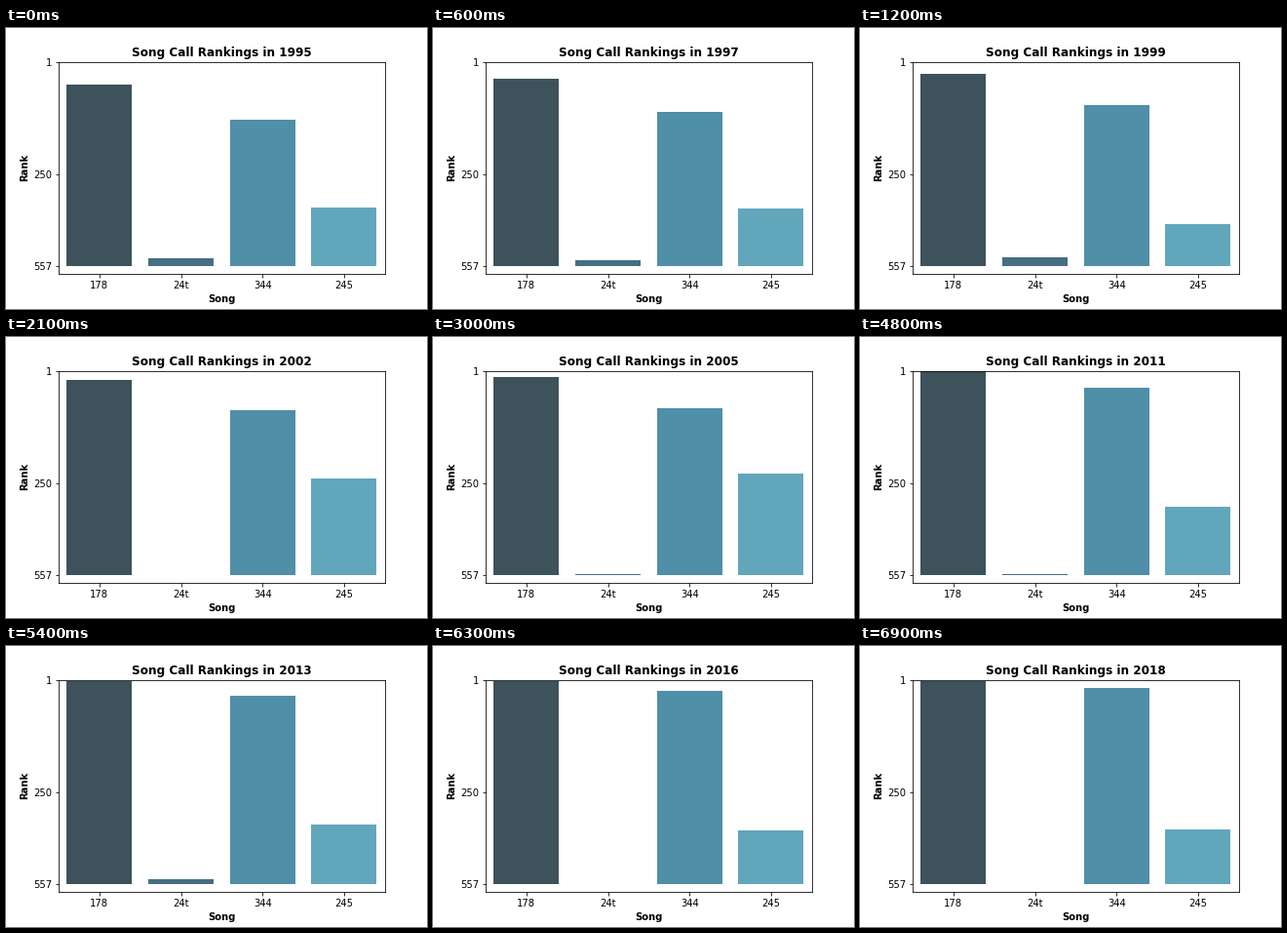
Write a matplotlib script that moves like this. It is 432x288 px and loops after 7200 ms.

```python
import matplotlib.pyplot as plt
from matplotlib.animation import FuncAnimation

FIRST_YEAR = 1995
STEP_MS = 300
LOW, HIGH = -20, 556
W, H, DPI = 432, 288, 72

SONGS = ["178", "24t", "344", "245"]
COLORS = ["#3d525a", "#466f82", "#4f8fa8", "#62a6bc"]

# Height of each bar's top edge on the stage, one value per year
TOPS = [
    [58, 55, 52, 49, 47, 47, 46, 44, 43, 42, 41, 41,
     40, 35, 35, 35, 35, 35, 36, 35, 36, 36, 35, 36],
    [236, 234, 238, 238, 235, 240, 242, 244, 240, 241, 243, 243,
     243, 233, 235, 233, 243, 237, 239, 239, 242, 244, 241, 244],
    [94, 90, 86, 83, 79, 78, 76, 75, 74, 74, 73, 73,
     72, 67, 62, 57, 52, 52, 51, 49, 48, 46, 45, 43],
    [184, 180, 185, 190, 201, 182, 163, 145, 144, 143, 140, 142,
     159, 163, 167, 170, 174, 178, 183, 192, 190, 189, 187, 188],
]
YEARS = len(TOPS[0])

plt.rcParams["font.family"] = "DejaVu Sans"
plt.rcParams["font.size"] = 10

fig = plt.figure(figsize=(W / DPI, H / DPI), dpi=DPI, facecolor="white")
ax = fig.add_axes([0.125, 0.125, 0.775, 0.755])
ax.set_xlim(-0.5, 3.5)
ax.set_ylim(LOW, HIGH)

bars = ax.bar(range(len(SONGS)), [0] * len(SONGS), width=0.8,
              color=COLORS, linewidth=0)
ax.set_xlim(-0.5, 3.5)
ax.set_ylim(LOW, HIGH)
ax.set_xticks(range(len(SONGS)), SONGS)
ax.set_yticks([0, 250, HIGH], ["557", "250", "1"])
ax.set_xlabel("Song", fontweight="bold")
ax.set_ylabel("Rank", fontweight="bold")
title = ax.set_title("", fontsize=12, fontweight="bold")


def to_value(top):
    """Convert a stage row to a value on the rank axis."""
    floor = 0.125 * H
    unit = 0.755 * H / (HIGH - LOW)
    return LOW + (H - top - floor) / unit


def draw(i):
    for bar, tops in zip(bars, TOPS):
        bar.set_height(to_value(tops[i]))
    title.set_text(f"Song Call Rankings in {FIRST_YEAR + i}")
    return [*bars, title]


anim = FuncAnimation(fig, draw, frames=YEARS, interval=STEP_MS,
                     repeat=True, repeat_delay=0, blit=False)
plt.show()
```
